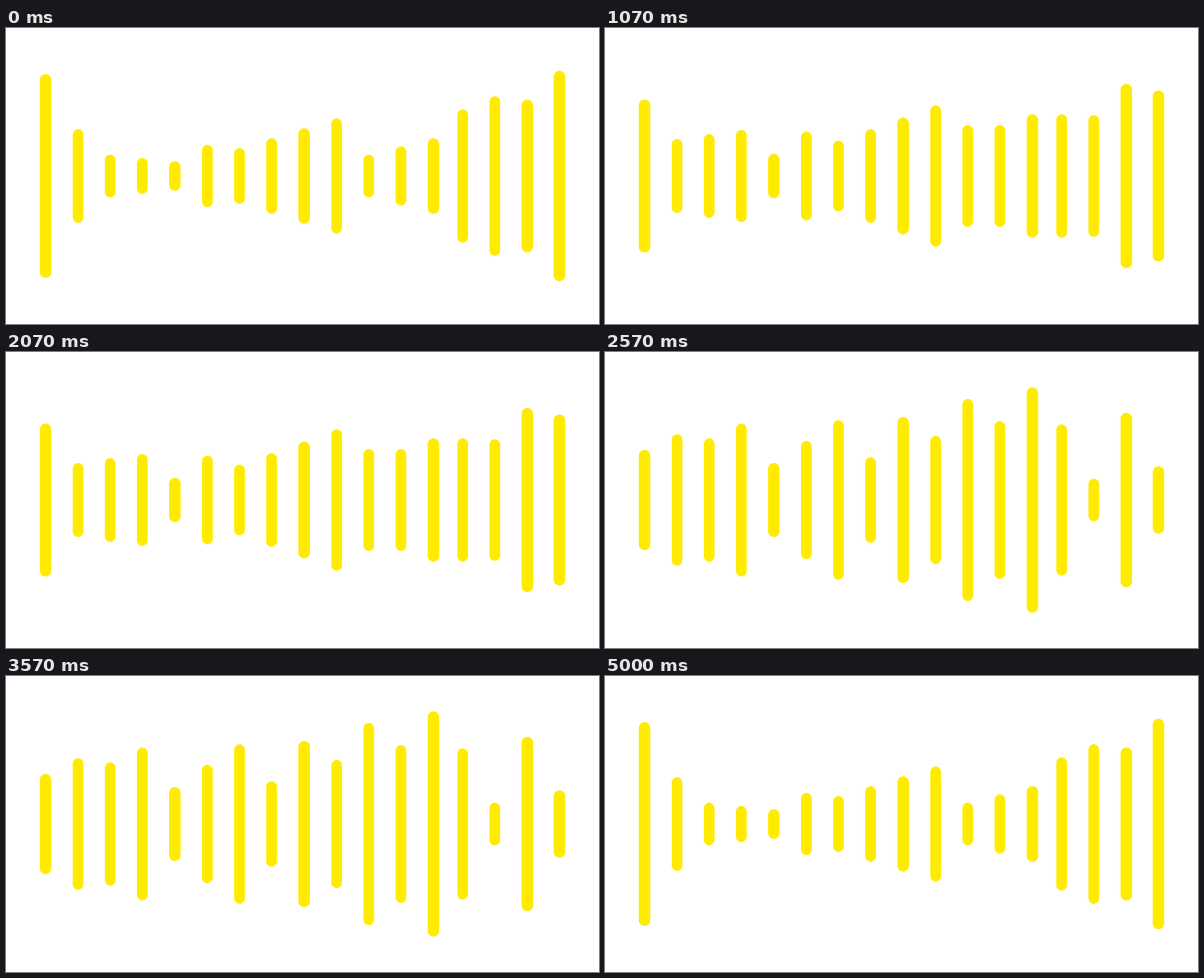
Write an HTML page with a canvas that moves like this. It is 720 by 360 pixels and loops after 5030 ms.

```html
<!DOCTYPE html>
<html>
<head>
<meta charset="utf-8">
<style>
  html, body { margin: 0; width: 100%; height: 100%; overflow: hidden; background: #fff; }
  canvas { display: block; }
</style>
</head>
<body>
<canvas id="stage" width="720" height="360"></canvas>
<script>
const ctx = document.getElementById('stage').getContext('2d');
const LOOP = 5030, FPS = 30, BARS = 17, WIDTH = 13.4;

// A wave outline from a few key heights; gaps run straight between neighbours
const outline = keys => Array.from({ length: BARS }, (_, i) => {
  let a = i, b = i;
  while (!(a in keys)) a--;
  while (!(b in keys)) b++;
  return keys[a] + (keys[b] - keys[a]) * (i - a) / (b - a || 1);
});

// The three key poses of each one-second cycle
const poses = [
  [248, 115, 52, , 36, 77, 68, , , 140, 53, , 92, 163, 194, 186, 256],
  [56, 38, 210, 257, 92, 173, 124, , , , 275, 231, 271, 123, 51, 304, 108],
  [125, 164, 147, 184, 90, , 196, 102, 203, 153, 245, 191, 274, 186, 53, 209, 81]
].map(outline);

// Two evenly spaced groups of bars
const leftEdge = i => i < 13 ? 41.3 + i * 39.25 : 547.8 + (i - 13) * 39.2;

// cubic-bezier(1/3, 0, 0, 1), solved by bisection
function ease(x) {
  let lo = 0, hi = 1;
  for (let k = 0; k < 30; k++) {
    const s = (lo + hi) / 2;
    if (s - 2 * s * s + 2 * s * s * s < x) lo = s; else hi = s;
  }
  return lo * lo * (3 - 2 * lo);
}

function drawBar(i, height) {
  const left = Math.round(leftEdge(i));
  const width = Math.round(leftEdge(i) + WIDTH) - left;
  const top = Math.round(180 - height / 2);
  ctx.roundRect(left, top, width, 360 - 2 * top, width / 2);
}

function draw(time) {
  // Steps of 1/30 s, starting on multiples of 10 ms
  const tick = Math.floor(time % LOOP / 10) * 10;
  const step = Math.floor((tick + 4) * FPS / 1000) % FPS;
  const pose = Math.floor(step / 10);
  const from = poses[pose], to = poses[(pose + 1) % 3];
  const f = ease(step % 10 / 10);

  ctx.fillStyle = '#fff';
  ctx.fillRect(0, 0, 720, 360);
  ctx.fillStyle = '#ffeb00';
  ctx.beginPath();
  from.forEach((h, i) => drawBar(i, h + (to[i] - h) * f));
  ctx.fill();
}

const start = performance.now();
function loop() {
  draw(performance.now() - start);
  requestAnimationFrame(loop);
}
loop();
</script>
</body>
</html>
```
